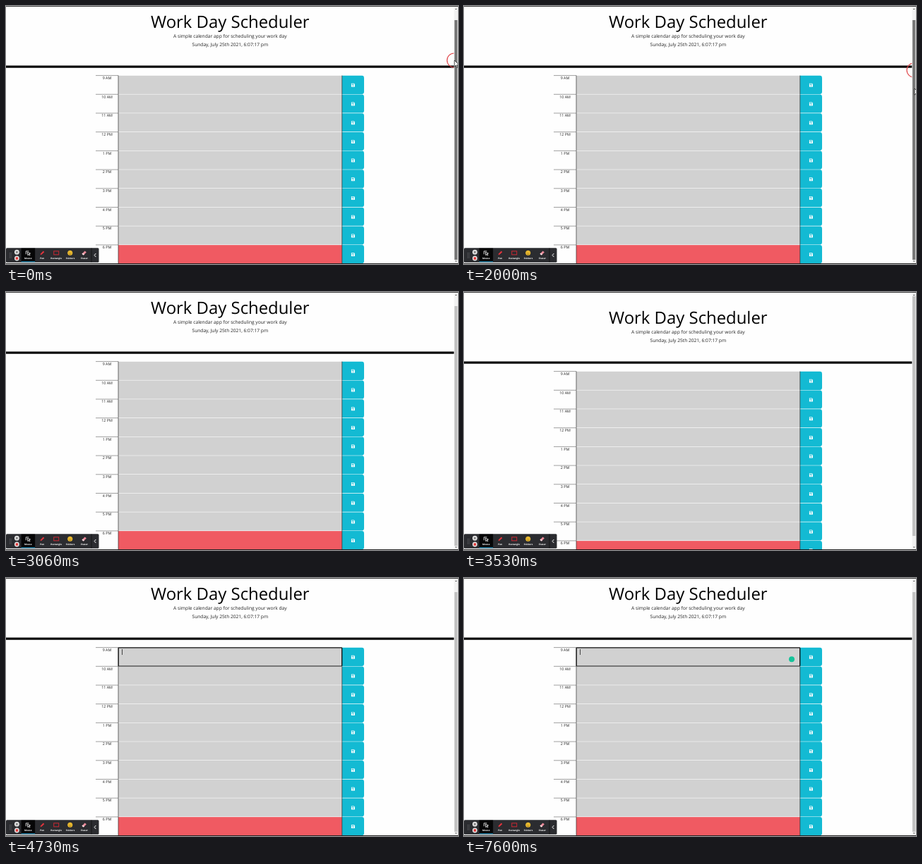
These frames come from a looping animation (640x366 px, 8000 ms). An HTML page:

```html
<!DOCTYPE html>
<html lang="en">
<head>
<meta charset="utf-8">
<title>Work Day Scheduler</title>
<style>
  html, body { margin: 0; width: 100%; height: 100%; overflow: hidden; background: #fefefe; }
  svg { display: block; width: 640px; height: 366px; }
  text { font-family: "Open Sans", sans-serif; text-anchor: middle; text-rendering: geometricPrecision; }
  #tools text { font-family: "Open Sans", sans-serif; font-size: 3.2px; font-weight: 700; fill: #fff; }
</style>
</head>
<body>
<svg viewBox="0 0 640 366">
  <defs>
    <clipPath id="view"><rect width="634.5" height="366"/></clipPath>
    <g id="disk">
      <path d="M-2.5-2.5h4l1 1v4h-5z" fill="#fff"/>
      <path d="M-1.7-1.8h2.8v1.3h-2.8z" fill="#13bad3"/>
      <circle cy="1" r=".8" fill="#13bad3"/>
    </g>
  </defs>
  <rect width="640" height="366" fill="#fefefe"/>

  <g clip-path="url(#view)">
    <g id="page">
      <text x="317.3" y="31" font-size="23.9">Work Day Scheduler</text>
      <g font-size="6.67" fill="#222">
        <text x="317.3" y="44.9">A simple calendar app for scheduling your work day</text>
        <text x="317.3" y="56.9">Sunday, July 25th 2021, 6:07:17 pm</text>
      </g>
      <rect y="84.5" width="635" height="3.2"/>
      <g id="rows"></g>
      <g id="focus">
        <rect x="159.2" y="98.8" width="316.4" height="26.2" rx=".8" fill="none" stroke="#111" stroke-width="1.2"/>
        <rect id="caret" x="164" y="101" width=".9" height="8" fill="#333"/>
        <circle id="badge" cx="464" cy="115.2" r="4" fill="#15c39a"/>
      </g>
    </g>
    <circle id="ring" r="10" fill="none" stroke="#e0484c" stroke-width="1.2"/>
  </g>

  <g id="bar">
    <rect x="634.5" width="5.5" height="366" fill="#f1f1f1"/>
    <rect id="thumb" x="635" width="4.2" height="340"/>
    <path d="M635.8 5l1.4-1.6 1.4 1.6zM635.8 361.5l1.4 1.6 1.4-1.6z" fill="#505050"/>
  </g>
  <path d="M0 .4H640M0 365.5H640" stroke="#111" stroke-width=".9"/>

  <g id="tools">
    <rect x="0" y="343.3" width="131.5" height="20.4" rx="1.5" fill="#2b2c30"/>
    <path d="M5.3 350v8M7.2 350v8" stroke="#85868a" stroke-width=".8" stroke-dasharray=".8 1.1"/>
    <circle cx="15.4" cy="349.2" r="3.4" fill="#e8e8e8"/>
    <path d="M14.6 347.7v3M16.2 347.7v3" stroke="#333" stroke-width=".8"/>
    <circle cx="15.4" cy="358" r="3.4" fill="#e8e8e8"/>
    <rect x="13.7" y="356.3" width="3.4" height="3.4" rx=".5" fill="#e23b3b"/>
    <rect x="21.5" y="343.6" width="19.6" height="19.8" fill="#060607"/>
    <rect x="21.5" y="362.2" width="19.6" height="1.1" fill="#35a8d8"/>
    <path d="M28.2 352.2v-4.4h4.2M30.2 349.2l4.3 1.7-1.8.8 1.3 1.7-.7.5-1.3-1.7-1 1.4z" fill="none" stroke="#fff" stroke-width=".8"/>
    <path d="M48.6 353.3l.6-2.1 3.6-3.7 1.5 1.5-3.7 3.6z" fill="#e5343d"/>
    <rect x="67.7" y="347.8" width="7" height="5" fill="none" stroke="#c92834" stroke-width="1"/>
    <circle cx="90.7" cy="350.2" r="3.5" fill="#f4c331"/>
    <path d="M89.4 348.7v1M92 348.7v1M88.7 351.2q2 2.2 4 0" fill="none" stroke="#6b4710" stroke-width=".7"/>
    <path d="M107.5 351.8l4.1-4.3 2.3 1.8-4.1 4.2z" fill="#ef8c9c"/>
    <path d="M107.5 351.8l1.2-1.3 2.3 1.8-1.2 1.2z" fill="#f6e1e4"/>
    <path d="M121 343.6v19.8" stroke="#111" stroke-width=".8"/>
    <path d="M127.3 351l-2.2 2.5 2.2 2.5" fill="none" stroke="#fff" stroke-width="1"/>
  </g>

  <path id="arrow" d="M0 0V9.2L2.1 7.2 3.5 10.4 5 9.7 3.6 6.6H6.5Z" fill="#fff" stroke="#111" stroke-width=".8" stroke-linejoin="round"/>
</svg>

<script>
const LOOP = 8000, ROW = 26.7, TOP = 98.6;
const $ = id => document.getElementById(id);

function add(parent, tag, attrs, text) {
  const el = document.createElementNS("http://www.w3.org/2000/svg", tag);
  for (const key in attrs) el.setAttribute(key, attrs[key]);
  if (text) el.textContent = text;
  return parent.appendChild(el);
}

const hours = ["9 AM", "10 AM", "11 AM", "12 PM", "1 PM", "2 PM", "3 PM", "4 PM", "5 PM", "6 PM"];
hours.forEach((hour, i) => {
  const g = add($("rows"), "g", { transform: `translate(0 ${TOP + i * ROW})` });
  add(g, "path", { d: "M127 0H159", stroke: "#777", "stroke-width": .7 });
  add(g, "text", { x: 143, y: 5.2, "font-size": 5.33, fill: "#222" }, hour);
  add(g, "rect", { x: 159, y: .2, width: 317, height: ROW - .6, fill: i < 9 ? "#d1d1d1" : "#f05a62" });
  add(g, "path", { d: `M475.8 .2H504q3 0 3 3.4V${ROW - 3.8}q0 3.4-3 3.4H475.8Z`, fill: "#13bad3" });
  add(g, "path", { d: `M159 0V${ROW}M475.8 0V${ROW}`, stroke: "#333", "stroke-width": .7 });
  add(g, "use", { href: "#disk", x: 491.4, y: 13.7 });
});

[["Mouse", 31.3], ["Pen", 51.2], ["Rectangle", 71.2], ["Stickers", 91], ["Eraser", 111]]
  .forEach(([label, x]) => add($("tools"), "text", { x, y: 359 }, label));

// Steps are [time, ...values], eased between neighbours.
const pointer = [
  [0, 635, 77], [60, 635, 77.5], [330, 636, 92], [660, 635, 86], [930, 634.5, 86],
  [1130, 637, 91], [1600, 637.5, 108], [2000, 638, 117], [2300, 638.5, 121], [2460, 642, 122]
];
const scroll = [[3130, 0], [3330, 14], [3700, 14], [3900, 0]];
const presses = [[0, 860, 634.5, 77], [1130, 2260, 637, 91]];

function at(steps, t) {
  let a = steps[0], b = a;
  for (const step of steps) {
    b = step;
    if (step[0] > t) break;
    a = step;
  }
  const span = b[0] - a[0];
  const k = span > 0 ? Math.min(1, Math.max(0, (t - a[0]) / span)) : 0;
  const e = k * k * (3 - 2 * k);
  return a.slice(1).map((v, i) => v + (b[i + 1] - v) * e);
}

const show = (id, on) => $(id).setAttribute("visibility", on ? "visible" : "hidden");
const move = (id, x, y) => $(id).setAttribute("transform", `translate(${x} ${y})`);

function draw(t) {
  const [x, y] = at(pointer, t);
  const [shift] = at(scroll, t);
  const press = presses.find(([from, to]) => t >= from && t < to);
  const focused = t >= 4400;

  move("arrow", x, y);
  move("page", 0, shift);
  $("thumb").setAttribute("y", 20 - shift);
  $("thumb").setAttribute("fill", press ? "#787878" : t < 2400 ? "#a8a8a8" : "#c1c1c1");

  show("ring", press);
  if (press) move("ring", press[2], press[3]);

  show("focus", focused);
  show("caret", focused && Math.floor((t - 4400) / 533) % 2 === 0);
  show("badge", t >= 5000);
}

const start = performance.now();
function tick() {
  draw((performance.now() - start) % LOOP);
  requestAnimationFrame(tick);
}
tick();
</script>
</body>
</html>
```
